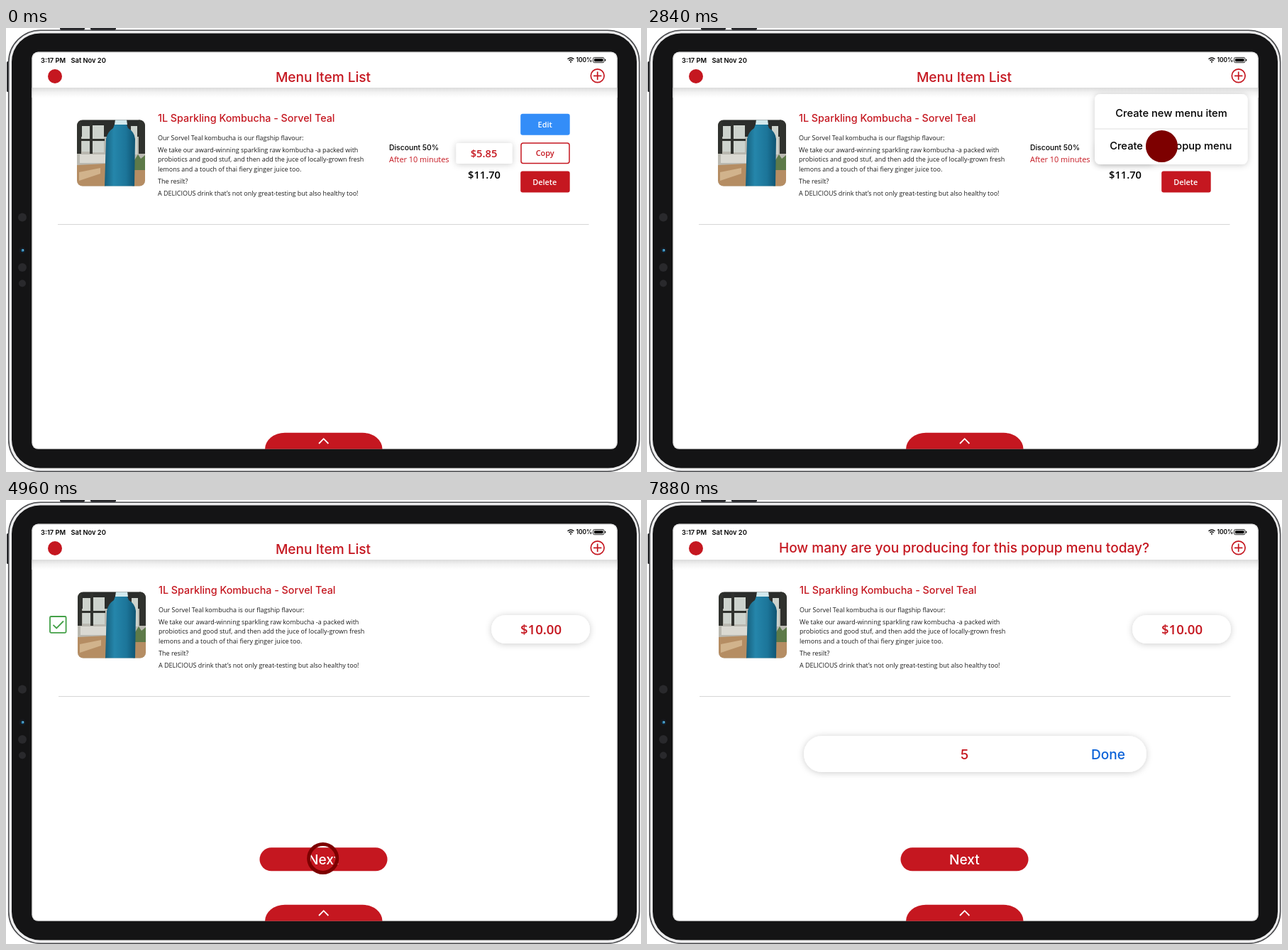
An HTML page that plays this animation: 895x625 px, repeating every 8000 ms.

```html
<!DOCTYPE html>
<html lang="en">
<head>
<meta charset="utf-8">
<title>Menu item list</title>
<style>
  html, body { margin: 0; width: 100%; height: 100%; overflow: hidden; background: #fff; }
  svg { display: block; width: 895px; height: 625px; }
  text { font-family: "Open Sans", sans-serif; }
  .ui { font: 500 19.1px Inter, sans-serif; }
  .status { font: 600 9.3px Inter, sans-serif; }
  .head { font: 500 14.3px Inter, sans-serif; }
  .body { font-size: 9px; fill: #1c1c1c; }
  .label { font-size: 10.9px; font-weight: 600; }
  .price { font-size: 14.7px; font-weight: 600; }
  .big { font-size: 18.6px; }
  .mid { text-anchor: middle; }
  .red { fill: #c51720; }
  .white { fill: #fff; }
  .blue { fill: #0b62d8; }
  .line { fill: none; stroke: #c51720; stroke-width: 1.7; }
</style>
</head>
<body>
<svg viewBox="0 0 895 625">
  <defs>
    <filter id="soft" x="-20%" y="-40%" width="140%" height="180%">
      <feDropShadow dx="0" dy="1" stdDeviation="5" flood-opacity=".2"/>
    </filter>
    <linearGradient id="fade" x2="0" y2="1">
      <stop stop-color="#dcdcdc"/><stop offset=".45" stop-color="#f2f2f2"/><stop offset="1" stop-color="#fff"/>
    </linearGradient>
    <linearGradient id="bottle">
      <stop stop-color="#175f7c"/><stop offset=".3" stop-color="#2586ab"/>
      <stop offset=".7" stop-color="#1c7599"/><stop offset="1" stop-color="#0f5472"/>
    </linearGradient>
    <clipPath id="photoClip"><rect x="100" y="129.5" width="96" height="93" rx="8"/></clipPath>
  </defs>

  <!-- Tablet -->
  <g fill="#26272a">
    <rect x="76" y="-2" width="35" height="5" rx="2"/>
    <rect x="119" y="-2" width="36" height="5" rx="2"/>
    <rect x="1" y="47" width="4" height="43" rx="1.5"/>
  </g>
  <rect x="3.7" y="3.2" width="889" height="621" rx="45" fill="#ededee" stroke="#4a4b4e" stroke-width="1.6"/>
  <rect x="8" y="7.5" width="881" height="612" rx="40" fill="#141415"/>
  <g fill="#29292c">
    <circle cx="23" cy="266.5" r="6"/><circle cx="23" cy="313" r="5" fill="#17181c"/>
    <circle cx="23" cy="337" r="6"/><circle cx="23" cy="359.5" r="5"/>
  </g>
  <circle cx="23.5" cy="313" r="2.2" fill="#1b6d9b"/><circle cx="24" cy="312.6" r=".9" fill="#a9e2f5"/>
  <rect x="36.3" y="33.5" width="825.5" height="559.3" rx="9" fill="#fff"/>

  <!-- Header -->
  <rect x="36.3" y="84" width="825.5" height="14" fill="url(#fade)"/>
  <text class="status" x="49" y="48.5">3:17 PM</text>
  <text class="status" x="91.5" y="48.5">Sat Nov 20</text>
  <text class="status" x="803.5" y="48.3" style="font-size:8.4px">100%</text>
  <g fill="none" stroke="#111" stroke-width="1.4">
    <path d="M791.5 43.8q4.5-3.8 9 0M793.4 45.9q2.6-2.2 5.2 0"/>
    <rect x="827.5" y="41.5" width="15.5" height="7.2" rx="2" stroke-width=".9"/>
  </g>
  <circle cx="796" cy="47.8" r="1"/>
  <rect x="829" y="43" width="12.5" height="4.2" rx="1"/><rect x="844" y="43.7" width="1.2" height="2.8" rx=".5"/>
  <circle class="red" cx="69" cy="68" r="10"/>
  <g class="line"><circle cx="833.7" cy="67.3" r="9.4"/><path d="M828 67.3h11.4M833.7 61.6v11.4"/></g>
  <text id="title" class="ui mid red" x="447"></text>

  <!-- Menu item -->
  <g id="item">
    <g clip-path="url(#photoClip)">
      <path fill="#b9b8b0" d="M100 129h96v94h-96z"/>
      <path fill="#2b2d2b" d="M100 129h96v24h-96z"/>
      <path fill="#cdd3cd" d="M107 138h11v36h-11zM122 137h16v38h-16zM176 138h9v40h-9z"/>
      <path fill="#30322e" d="M100 129h6v48h-6zM118 131h4v46h-4zM187 129h9v48h-9zM104 156h35v3h-35z"/>
      <path fill="#dad9d2" d="M104 178h36v12h-36z"/>
      <path fill="#5d7a49" d="M181 186l5-8 4 6 6-5v22h-15z"/>
      <path fill="#b58d63" d="M100 193l40-2v32h-40zM178 200h18v23h-18z"/>
      <path fill="#d1b38c" d="M103 203l30-6v8l-30 10z"/>
      <path fill="url(#bottle)" d="M139 223l2-67q2-10 10-15l3-8h15l3 8q9 5 10 15l-1 67z"/>
      <path fill="#d1e8ec" d="M154 129h16l1 7h-18z"/>
    </g>
    <text class="head red" x="214" y="131.5">1L Sparkling Kombucha - Sorvel Teal</text>
    <g class="body">
      <text x="214" y="157.5">Our Sorvel Teal kombucha is our flagship flavour:</text>
      <text x="214" y="174.5">We take our award-winning sparkling raw kombucha -a packed with</text>
      <text x="214" y="188">probiotics and good stuf, and then add the juce of locally-grown fresh</text>
      <text x="214" y="201.5">lemons and a touch of thai fiery ginger juice too.</text>
      <text x="214" y="218.7">The resilt?</text>
      <text x="214" y="235.7">A DELICIOUS drink that’s not only great-testing but also healthy too!</text>
    </g>
    <path d="M73 276.5h748.5" stroke="#d6d6d6"/>
  </g>

  <!-- Editable list -->
  <g id="list">
    <text class="head" x="540" y="172" style="font-size:10.4px">Discount 50%</text>
    <text class="label red" x="540" y="188.7" style="font-weight:400">After 10 minutes</text>
    <rect class="white" x="634.5" y="162" width="79" height="29" rx="3" filter="url(#soft)"/>
    <text class="price mid red" x="673.5" y="181.7">$5.85</text>
    <text class="price mid" x="674" y="212">$11.70</text>
    <rect x="725.2" y="120.8" width="69.5" height="30" rx="3" fill="#338df8"/>
    <rect class="line" x="726" y="162" width="68" height="28.5" rx="3" style="stroke-width:1.5"/>
    <rect class="red" x="725.2" y="201.6" width="69.5" height="30" rx="3"/>
    <text class="label mid white" x="759.7" y="139.7">Edit</text>
    <text class="label mid red" x="759.7" y="180">Copy</text>
    <text class="label mid white" x="759.3" y="221">Delete</text>
  </g>
  <g id="popup">
    <rect class="white" x="631" y="93" width="215.5" height="99" rx="8" filter="url(#soft)"/>
    <path d="M631 142h215.5" stroke="#dedede"/>
    <text class="head mid" x="739" y="124.5" style="font-size:14.7px">Create new menu item</text>
    <text class="head mid" x="738.3" y="170.5" style="font-size:14.7px">Create new popup menu</text>
  </g>

  <!-- Selection and quantity -->
  <g id="order">
    <rect class="white" x="684" y="162" width="139" height="40" rx="20" filter="url(#soft)"/>
    <text class="price big mid red" x="754" y="188.5">$10.00</text>
    <rect class="red" x="357.5" y="489.3" width="180" height="33" rx="16.5"/>
    <text class="ui mid white" x="447.3" y="513">Next</text>
  </g>
  <g id="box" fill="none" stroke-width="1.8">
    <rect x="62" y="164" width="22.6" height="22.8" rx="1.5"/>
    <path id="tick" d="M66.5 175.8l4.7 4.7 9.8-10"/>
  </g>
  <g id="quantity">
    <rect class="white" x="221" y="332" width="483" height="51" rx="25.5" filter="url(#soft)"/>
    <text class="ui mid red" x="447.5" y="365">5</text>
    <text class="ui mid blue" x="650" y="365">Done</text>
  </g>

  <path class="red" d="M365 592.8a28 23 0 0 1 28-23h109.5a28 23 0 0 1 28 23z"/>
  <path d="M441 585l6.7-6.8 6.7 6.8" fill="none" stroke="#fff" stroke-width="1.8"/>
  <rect x="37" y="34.2" width="824" height="558" rx="8.5" fill="none" stroke="#000" stroke-opacity=".1" stroke-width="1.4"/>
  <circle id="tap" fill="none" stroke="#7d0000"/>
</svg>
<script>
const LOOP = 8000, STEP = 40, TAP_TIME = 360, TAP_RADIUS = 22.5;
const taps = [
  [1400, 833.5, 67.5], [2840, 725.5, 166.5], [3800, 72.5, 176.5],
  [4680, 446.7, 504.5], [6760, 655.3, 357.5], [7520, 446.7, 504.5]
];
const $ = id => document.getElementById(id);
const show = (id, on) => $(id).style.display = on ? "" : "none";

// A solid disc whose hole grows until only its rim is gone.
function drawTap(time) {
  const tap = taps.find(([start]) => time >= start && time < start + TAP_TIME);
  show("tap", tap);
  if (!tap) return;
  const [start, x, y] = tap;
  const hole = TAP_RADIUS * (time - start) / TAP_TIME;
  const attrs = { cx: x, cy: y, r: (TAP_RADIUS + hole) / 2, "stroke-width": TAP_RADIUS - hole };
  for (const name in attrs) $("tap").setAttribute(name, attrs[name]);
}

function draw(now) {
  const time = Math.floor(now % LOOP / STEP) * STEP;
  const selecting = time >= 3360, counting = time >= 5400, checked = time >= 4320;

  $("title").textContent = counting ? "How many are you producing for this popup menu today?" : "Menu Item List";
  $("title").setAttribute("y", counting ? 73.5 : 75.5);
  $("item").setAttribute("transform", `translate(${selecting ? 1 : 0})`);
  show("list", !selecting);
  show("popup", time >= 1960 && !selecting);
  $("popup").style.opacity = time < 2000 ? .5 : 1;
  show("order", selecting);
  show("box", selecting && !counting);
  $("box").setAttribute("stroke", checked ? "#43a047" : "#999");
  show("tick", checked);
  show("quantity", counting);
  drawTap(time);
}

const begin = performance.now();
function frame() {
  draw(performance.now() - begin);
  requestAnimationFrame(frame);
}
frame();
</script>
</body>
</html>
```
